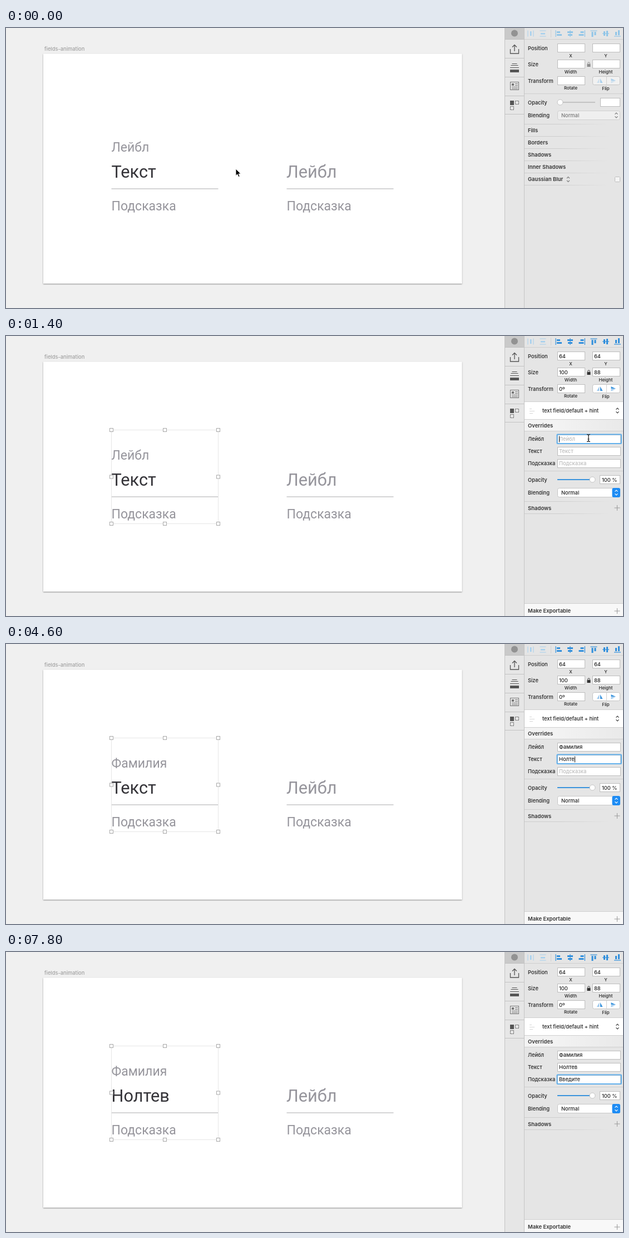
These frames come from a looping animation (1109 px wide and 505 px high, 8 s). An HTML page:

```html
<!DOCTYPE html>
<html lang="ru">
<head>
<meta charset="utf-8">
<title>Text field overrides</title>
<style>
html, body { margin: 0; width: 100%; height: 100%; overflow: hidden; background: #f0f0f0; }
svg { display: block; width: 1109px; height: 505px; }
text { font: 500 9.3px Inter, sans-serif; fill: #222; white-space: pre; }
.bold { font-weight: 600; font-size: 9.5px; fill: #333; }
.tiny { font-size: 7.9px; text-anchor: middle; }
.name { font-size: 9.3px; fill: #a0a0a0; }
.small { font: 400 23px Roboto, sans-serif; fill: #96959c; }
.large { font: 400 30.7px Roboto, sans-serif; fill: #343338; }
.hint { fill: #bcbcbc; }
</style>
</head>
<body>
<svg id="stage" viewBox="0 0 1109 505"></svg>
<script>
const LOOP = 8000, STEP = 200;
const VALUES = ['Фамилия', 'Нолтев', 'Введите'];
const HINTS = ['Лейбл', 'Текст', 'Подсказка'];
const FIELD_Y = [178, 200, 222];

// [time, letters typed] for each field
const TYPING = [
  [[0, 0], [1800, 1], [2000, 2], [2200, 4], [2400, 5], [2600, 7]],
  [[0, 0], [4000, 1], [4200, 2], [4400, 4], [4600, 5], [4800, 6]],
  [[0, 0], [6200, 1], [6400, 2], [6600, 3], [6800, 4], [7000, 5], [7200, 6], [7400, 7]]
];
const FOCUS = [[0, -1], [1400, 0], [3600, 1], [6000, 2]];
const SELECT_AT = 600;
const CARET_OFF = [5000, 7800];
const POINTER = [[0, 413, 254], [200, 380, 255], [400, 300, 256], [600, 269, 256], [800, 300, 253],
  [1000, 720, 215], [1200, 1030, 186], [1400, 1047, 184], [3000, 1047, 184], [3400, 1016, 211],
  [5200, 1016, 211], [5400, 1023, 213], [5800, 1026, 229], [8000, 1026, 229]];
const SHAPE = [[0, 'arrow'], [1200, 'beam'], [1800, ''], [3000, 'beam'], [3800, ''],
  [5200, 'arrow'], [5600, 'beam'], [6200, '']];

const rect = (x, y, w, h, fill, extra = '') =>
  `<rect x="${x}" y="${y}" width="${w}" height="${h}" fill="${fill}" ${extra}/>`;
const text = (x, y, s, cls = '', extra = '') => `<text x="${x}" y="${y}" class="${cls}" ${extra}>${s}</text>`;
const path = (d, stroke, extra = '') => `<path d="${d}" fill="none" stroke="${stroke}" ${extra}/>`;
const group = (content, extra = '') => `<g ${extra}>${content}</g>`;
const input = (x, y, w, h = 15) => rect(x + .5, y + .5, w - 1, h, '#fff', 'stroke="#bdbdbd"');
const rule = y => rect(932, y, 177, 1, '#cfcfcf');
const fadeRule = y => rect(932, y, 153, 1, 'url(#fade)');
const chevrons = (x, y, color) =>
  path(`M${x - 2.5} ${y - 1.8}l2.5-2.6 2.5 2.6M${x - 2.5} ${y + 1.8}l2.5 2.6 2.5-2.6`, color, 'stroke-width="1.1"');
const plus = y => path(`M1093.5 ${y}h10M1098.5 ${y - 5}v10`, '#999');

function canvas() {
  const line = x => rect(x, 289.5, 192, 1, '#a9a9ac');
  return rect(0, 0, 897, 505, '#f0f0f0') + text(69, 40.5, 'fields-animation', 'name') +
    rect(67, 46.5, 752.5, 414.5, '#fff', 'filter="url(#shadow)"') +
    text(189.5, 223, 'Лейбл', 'small', 'id="label"') +
    text(189.5, 269.7, 'Текст', 'large', 'id="value"') +
    line(189.5) + text(189.5, 328.5, 'Подсказка', 'small') +
    text(504, 269.7, 'Лейбл', 'large', 'style="fill:#96959c"') +
    line(504.5) + text(504.5, 328.5, 'Подсказка', 'small');
}

function selection() {
  const xs = [189.5, 285.5, 381.5], ys = [169.5, 254, 338.5];
  let out = rect(189.5, 169.5, 192, 169, 'none', 'stroke="#e6e6e6"');
  xs.forEach((x, i) => ys.forEach((y, j) => {
    if (i !== 1 || j !== 1) out += rect(x - 3, y - 3, 6, 6, '#fff', 'stroke="#a8a8a8"');
  }));
  return out;
}

function strip() {
  const ink = '#555';
  let out = rect(897, 0, 35, 505, '#e6e6e6') + rect(897, 0, 34, 20, '#c9c9c9') +
    rect(896, 0, 1, 505, '#c4c4c4') + rect(931, 0, 1, 505, '#c4c4c4');
  for (const y of [20, 54, 88, 122, 155]) out += rect(897, y, 34, 1, '#c2c2c2');
  out += '<circle cx="914" cy="9.5" r="6" fill="#929292"/>';
  out += path('M906.5 38v8h15v-8M914 42V30.5M910 34.5l4-4 4 4', ink, 'stroke-width="1.3"');
  out += path('M909.5 64.5h9M907.5 67.5h13M906 71.5h16', ink) + rect(906, 75, 16, 5, ink);
  out += rect(906.5, 97.5, 15, 14, 'none', 'stroke="#777"') + rect(909, 100, 4, 4, '#777') +
    path('M915 100.5h5M915 103.5h5M909 106.5h11M909 109.5h11', '#777');
  out += rect(906, 131, 7, 8, ink);
  for (const [x, y] of [[915.5, 131.5], [906.5, 141.5]])
    out += rect(x, y, 6, 6, 'none', `stroke="${ink}" stroke-dasharray="2 1"`);
  return out;
}

function alignIcons(color, spreadColor) {
  const edge = rect(-5.5, -6, 1.2, 12, color) + rect(-3, -4, 6, 3, color) + rect(-3, 1, 9, 3, color);
  const middle = rect(-.6, -6, 1.2, 12, color) + rect(-5, -4, 10, 3, color) + rect(-4, 1, 8, 3, color);
  const spread = rect(-5.5, -5.5, 1, 11, spreadColor) + rect(4.5, -5.5, 1, 11, spreadColor) +
    rect(-1, -4, 2.5, 8, spreadColor);
  const at = (x, icon, turn = '') => group(icon, `transform="translate(${x} 10) ${turn}"`);
  return at(943, spread) + at(965, spread, 'rotate(90)') + rect(979, 3, 1, 14, '#d2d2d2') +
    at(993, edge) + at(1014, middle) + at(1035.5, edge, 'scale(-1 1)') +
    at(1056.5, edge, 'rotate(90)') + at(1078, middle, 'rotate(90)') + at(1099, edge, 'rotate(-90)');
}

function geometry(active) {
  const blue = active ? '#3b94dd' : '#a9d0ed', ink = active ? '#333' : '#8c8c8c';
  const triangle = (d, opacity) => `<path d="${d}" fill="${blue}" opacity="${opacity}"/>`;
  let out = alignIcons(active ? '#318fdc' : '#90c5e8', '#a5d0ee') + rule(20);
  ['Position', 'Size', 'Transform'].forEach((s, i) => out += text(938, [40, 69, 99][i], s));
  for (const [x, y] of [[991, 28], [1054, 28], [991, 57], [1054, 57], [991, 87]]) out += input(x, y, 50);
  out += rect(1054.5, 87.5, 49, 15, active ? '#fff' : '#f1f1f1', 'rx="3" stroke="#c4c4c4"') +
    rect(1079, 88, 1, 15, '#d0d0d0') +
    triangle('M1066.5 91v8h-4.5z', .5) + triangle('M1068 91v8h4.5z', 1) +
    triangle('M1087.5 91v4h8.5z', 1) + triangle('M1087.5 99.5v-4h8.5z', .5);
  out += rect(1044.5, 65, 6, 5, ink) + path('M1045.8 65v-1.5a1.7 1.7 0 0 1 3.4 0v1.5', ink);
  for (const [x, y, s] of [[1015, 52.5, 'X'], [1078, 52.5, 'Y'], [1015, 82, 'Width'], [1078, 82, 'Height'],
    [1015, 111, 'Rotate'], [1078, 112, 'Flip']]) out += text(x, y, s, 'tiny');
  if (active) for (const [x, y, s] of [[994, 40, '64'], [1057, 40, '64'], [994, 69, '100'], [1057, 69, '88'],
    [994, 99, '0º']]) out += text(x, y, s);
  return out + rule(118);
}

const knob = (x, y) => `<circle cx="${x}" cy="${y}" r="5" fill="#fff" stroke="#b8b8b8" stroke-width=".8"/>`;

function idlePanel() {
  let out = rect(932, 0, 177, 505, '#e5e5e5') + geometry(false) +
    text(938, 138, 'Opacity') + rect(996, 133, 63, 2, '#c3c3c3') + knob(996, 134) + input(1068, 126, 36) +
    text(938, 160.5, 'Blending') +
    rect(991.5, 149.5, 112, 16, '#efefef', 'rx="3" stroke="#cfcfcf"') +
    text(998, 160.5, 'Normal', '', 'style="fill:#777"') + chevrons(1097, 157.5, '#777');
  ['Fills', 'Borders', 'Shadows', 'Inner Shadows', 'Gaussian Blur'].forEach((s, i) =>
    out += fadeRule(173 + 22 * i) + text(938, 188.3 + 22 * i, s, 'bold'));
  return out + fadeRule(283) + chevrons(1010.5, 273, '#777') +
    rect(1094.5, 268.5, 9, 9, '#f4f4f4', 'rx="1" stroke="#bdbdbd"');
}

function activePanel() {
  let out = rect(932, 0, 177, 505, '#e5e5e5') + geometry(true) +
    rect(932, 119, 177, 31, '#fff') + text(964, 138, 'text field/default + hint') + chevrons(1099, 134.5, '#333') +
    path('M941 131.5h4M941 135.5h9M941 139.5h6', '#d5d5d5') +
    rect(932, 150, 177, 21, 'url(#header)') + rule(150) + rule(171) + text(938, 164.5, 'Overrides', 'bold');
  HINTS.forEach((s, i) => {
    const y = FIELD_Y[i];
    out += text(938, y + 11.3, s) + input(991, y, 114) +
      rect(990.5, y - .5, 115.5, 16.5, 'none', `id="ring${i}" stroke="#62b0ec" stroke-width="2" rx="1"`) +
      text(994, y + 11, s, 'hint', `id="field${i}"`);
  });
  return out + rect(0, 0, 1, 11, '#111', 'id="caret"') + rule(243) +
    text(938, 262.5, 'Opacity') + rect(991, 258, 60, 2, '#3b94dd') + knob(1054, 259) +
    input(1067, 251, 37) + text(1071, 262.5, '100 %') +
    text(938, 285.5, 'Blending') + rect(991.5, 274.5, 112, 16, '#fff', 'rx="3" stroke="#c6c6c6"') +
    text(998, 285.5, 'Normal') + rect(1089.5, 274, 14.5, 17, '#1e8cf4', 'rx="3"') + chevrons(1097, 282.5, '#fff') +
    fadeRule(298) + text(938, 313.5, 'Shadows', 'bold') + plus(310) + fadeRule(320) +
    rect(932, 483, 177, 22, '#f8f8f8') + rule(482) + text(938, 499.3, 'Make Exportable', 'bold') + plus(496);
}

const pointers =
  group('<path d="M0 0V12.5L2.9 9.8 5 14.6 7.1 13.7 5.1 9H9z" fill="#000" stroke="#fff" stroke-width=".9"/>', 'id="arrow"') +
  group(path('M-3-6.5Q0-6.5 0-4.5Q0-6.5 3-6.5M0-5V5M-3 6.5Q0 6.5 0 4.5Q0 6.5 3 6.5M-1.5 2h3', '#111', 'stroke-width="1.2"'), 'id="beam"');

const stage = document.getElementById('stage');
stage.innerHTML = `<defs>
  <linearGradient id="fade"><stop offset=".4" stop-color="#cdcdcd"/><stop offset="1" stop-color="#cdcdcd" stop-opacity="0"/></linearGradient>
  <linearGradient id="header"><stop offset=".3" stop-color="#f3f3f3"/><stop offset="1" stop-color="#e9e9e9"/></linearGradient>
  <filter id="shadow"><feDropShadow dx="0" dy="1" stdDeviation="1.1" flood-opacity=".42"/></filter>
  </defs>` + canvas() + group(selection(), 'id="selection"') + strip() +
  group(idlePanel(), 'id="idle"') + group(activePanel(), 'id="active"') + pointers;

const $ = id => document.getElementById(id);
const show = (id, on) => $(id).style.display = on ? '' : 'none';
const setText = (id, s) => { if ($(id).textContent !== s) $(id).textContent = s; };
const latest = (steps, t) => steps.filter(s => s[0] <= t).pop()[1];

function pointerAt(t) {
  const i = POINTER.findIndex(p => p[0] > t);
  const [t0, x0, y0] = POINTER[i - 1], [t1, x1, y1] = POINTER[i];
  const k = (t - t0) / (t1 - t0);
  return [x0 + (x1 - x0) * k, y0 + (y1 - y0) * k];
}

function render(t) {
  const selected = t >= SELECT_AT, focus = latest(FOCUS, t);
  for (const id of ['selection', 'active']) show(id, selected);
  show('idle', !selected);
  setText('label', focus > 0 ? VALUES[0] : HINTS[0]);
  setText('value', focus > 1 ? VALUES[1] : HINTS[1]);
  show('caret', focus >= 0 && !CARET_OFF.includes(t));

  VALUES.forEach((word, i) => {
    const count = latest(TYPING[i], t), field = $('field' + i);
    setText('field' + i, count ? word.slice(0, count) : HINTS[i]);
    field.setAttribute('class', count ? '' : 'hint');
    show('ring' + i, i === focus);
    if (i === focus) {
      $('caret').setAttribute('x', 994 + (count ? field.getComputedTextLength() + .3 : 0));
      $('caret').setAttribute('y', FIELD_Y[i] + 2.5);
    }
  });

  const shape = latest(SHAPE, t), [x, y] = pointerAt(t);
  for (const id of ['arrow', 'beam']) {
    show(id, id === shape);
    $(id).setAttribute('transform', `translate(${x} ${y})`);
  }
}

const start = performance.now();
let shown = -1;
function tick() {
  const t = Math.floor((performance.now() - start) % LOOP / STEP) * STEP;
  if (t !== shown) render(shown = t);
  requestAnimationFrame(tick);
}
tick();
</script>
</body>
</html>
```
